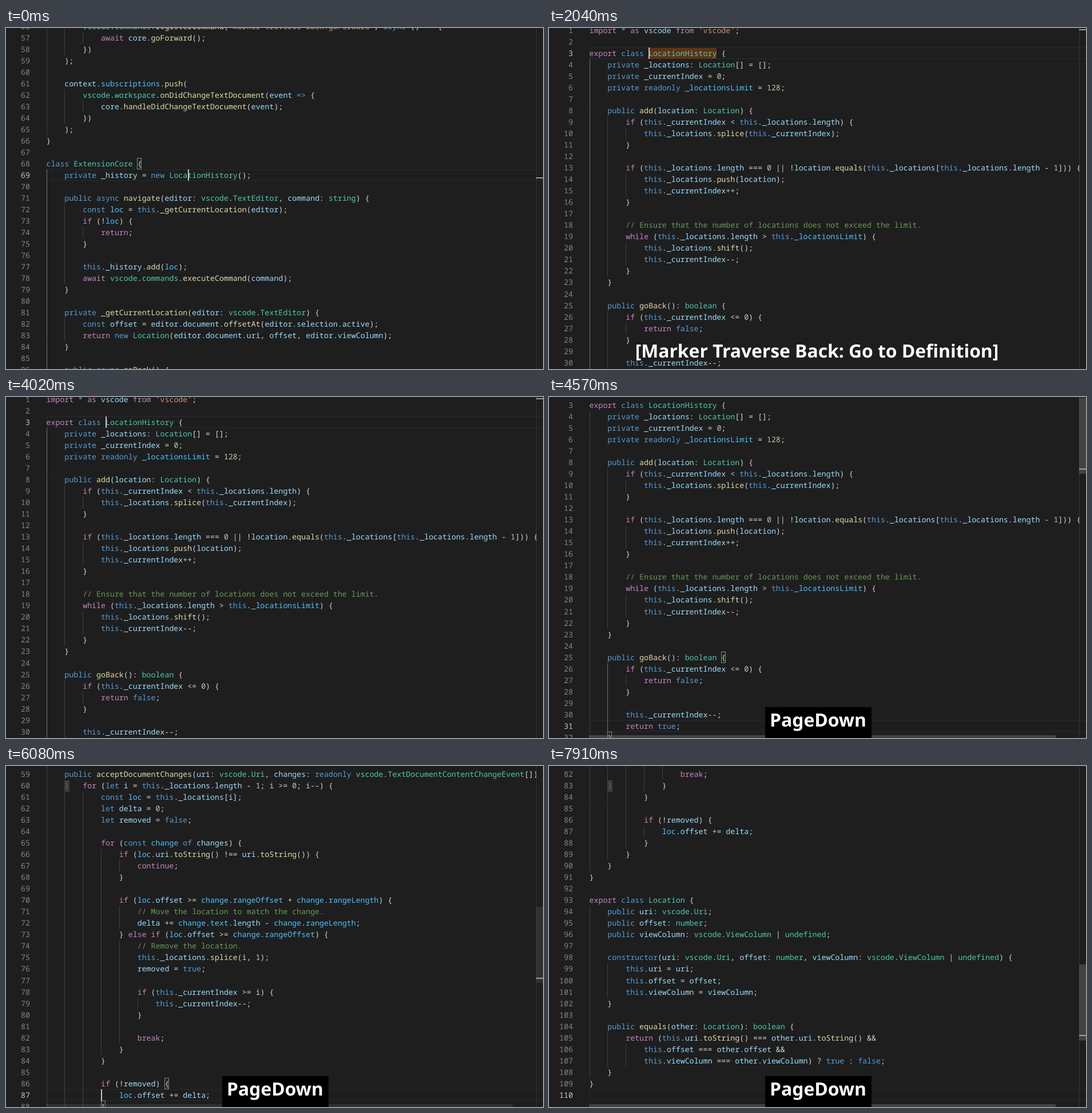
An HTML page with a canvas for the animation above (8000 ms loop, 939 by 596 pixels).

```html
<!DOCTYPE html>
<html lang="en">
<head>
<meta charset="utf-8">
<title>Code navigation</title>
<style>
html, body { margin: 0; width: 100%; height: 100%; overflow: hidden; background: #1e1e1e; }
canvas { display: block; }
</style>
</head>
<body>
<canvas id="stage" width="939" height="596"></canvas>
<script>
const LOOP = 8000, W = 939, H = 596;
const LEFT = 70.5, CHAR = 7.96, ROW = 20.02;
const ctx = document.getElementById('stage').getContext('2d');

const extensionFile = { first: 56, text: `
        vscode.commands.registerCommand('marker-traverse-back.goForward', async () => {
            await core.goForward();
        })
    );

    context.subscriptions.push(
        vscode.workspace.onDidChangeTextDocument(event => {
            core.handleDidChangeTextDocument(event);
        })
    );
}

class ExtensionCore {
    private _history = new LocationHistory();

    public async navigate(editor: vscode.TextEditor, command: string) {
        const loc = this._getCurrentLocation(editor);
        if (!loc) {
            return;
        }

        this._history.add(loc);
        await vscode.commands.executeCommand(command);
    }

    private _getCurrentLocation(editor: vscode.TextEditor) {
        const offset = editor.document.offsetAt(editor.selection.active);
        return new Location(editor.document.uri, offset, editor.viewColumn);
    }

    public async goBack() {` };

const historyFile = { first: 1, text: `
import * as vscode from 'vscode';

export class LocationHistory {
    private _locations: Location[] = [];
    private _currentIndex = 0;
    private readonly _locationsLimit = 128;

    public add(location: Location) {
        if (this._currentIndex < this._locations.length) {
            this._locations.splice(this._currentIndex);
        }

        if (this._locations.length === 0 || !location.equals(this._locations[this._locations.length - 1])) {
            this._locations.push(location);
            this._currentIndex++;
        }

        // Ensure that the number of locations does not exceed the limit.
        while (this._locations.length > this._locationsLimit) {
            this._locations.shift();
            this._currentIndex--;
        }
    }

    public goBack(): boolean {
        if (this._currentIndex <= 0) {
            return false;
        }

        this._currentIndex--;
        return true;
    }

    public goForward(): boolean {
        if (this._currentIndex >= this._locations.length - 1) {
            return false;
        }

        this._currentIndex++;
        return true;
    }

    public get locations(): readonly Location[] {
        return this._locations;
    }

    public get current(): Location | undefined {
        if (this._currentIndex >= this._locations.length) {
            return undefined;
        }

        return this._locations[this._currentIndex];
    }

    public get currentIndex(): number {
        return this._currentIndex;
    }

    public acceptDocumentChanges(uri: vscode.Uri, changes: readonly vscode.TextDocumentContentChangeEvent[]) {
        for (let i = this._locations.length - 1; i >= 0; i--) {
            const loc = this._locations[i];
            let delta = 0;
            let removed = false;

            for (const change of changes) {
                if (loc.uri.toString() !== uri.toString()) {
                    continue;
                }

                if (loc.offset >= change.rangeOffset + change.rangeLength) {
                    // Move the location to match the change.
                    delta += change.text.length - change.rangeLength;
                } else if (loc.offset >= change.rangeOffset) {
                    // Remove the location.
                    this._locations.splice(i, 1);
                    removed = true;

                    if (this._currentIndex >= i) {
                        this._currentIndex--;
                    }

                    break;
                }
            }

            if (!removed) {
                loc.offset += delta;
            }
        }
    }
}

export class Location {
    public uri: vscode.Uri;
    public offset: number;
    public viewColumn: vscode.ViewColumn | undefined;

    constructor(uri: vscode.Uri, offset: number, viewColumn: vscode.ViewColumn | undefined) {
        this.uri = uri;
        this.offset = offset;
        this.viewColumn = viewColumn;
    }

    public equals(other: Location): boolean {
        return (this.uri.toString() === other.uri.toString() &&
            this.offset === other.offset &&
            this.viewColumn === other.viewColumn) ? true : false;
    }
}
` };

const words = list => new Set(list.split(' '));
const control = words('import export from as if else return while for await continue break');
const storage = words('class const let private public readonly new this async true false undefined constructor of get');
const types = words('vscode workspace commands string number boolean');
const constants = words('loc change rangeOffset rangeLength text _locationsLimit subscriptions');

function tokenColor(token, before, after) {
  if (token.startsWith('//')) return '#6a9955';
  if (token[0] === "'") return '#ce9178';
  if (/^\d/.test(token)) return '#b5cea8';
  if (token === '=>' || token === '*') return '#569cd6';
  if (!/^\w/.test(token)) return '#d4d4d4';
  if (control.has(token)) return '#c586c0';
  if (token === 'undefined' && before.endsWith('| ')) return '#4ec9b0';
  if (storage.has(token)) return '#569cd6';
  if (/^[A-Z]/.test(token)) return '#4ec9b0';
  if (types.has(token) && !before.startsWith('import')) return '#4ec9b0';
  if (after[0] === '(') return '#dcdcaa';
  return constants.has(token) ? '#4fc1ff' : '#9cdcfe';
}

function parse(file) {
  const rows = file.text.slice(1).split('\n');
  const depth = i => rows[i] ? rows[i].search(/\S/) / 4 : 0;
  file.lines = rows.map((row, i) => {
    const tokens = [...row.matchAll(/\/\/.*|'[^']*'|\w+|=>|[^\w\s]/g)].map(({ 0: text, index }) => ({
      text, col: index,
      color: tokenColor(text, row.slice(0, index), row.slice(index + text.length)),
    }));
    let indent = depth(i);
    if (!row && i > 0 && i < rows.length - 1) {
      const up = depth(i - 1), down = depth(i + 1);
      indent = up === down ? up : 1 + Math.min(up, down);
    }
    return { number: file.first + i, tokens, indent };
  });
}
[extensionFile, historyFile].forEach(parse);

// guide: [level, first line, last line]; brackets: [line, column]
const views = [
  { at: 0, file: extensionFile, line: 69, col: 31, top: 247.2, guide: [0, 69, 90], brackets: [[68, 20]] },
  { at: 1980, file: historyFile, line: 3, col: 13, top: 34.4, guide: [0, 4, 90], brackets: [] },
  { at: 4100, file: historyFile, line: 31, col: 13, top: 565, guide: [1, 26, 31], brackets: [[25, 29], [32, 4]] },
  { at: 5130, file: historyFile, line: 59, col: 13, top: 565, guide: [1, 60, 89], brackets: [[32, 4]] },
  { at: 5270, file: historyFile, line: 59, col: 13, top: 565, guide: [1, 60, 89], brackets: [] },
  { at: 6010, file: historyFile, line: 87, col: 12, top: 565, guide: [3, 87, 87], brackets: [[86, 26], [88, 12]] },
  { at: 7450, file: historyFile, line: 110, col: 0, top: 565, guide: [0, 0, 0], brackets: [] },
];
const cursorOn = [[0, 460], [920, 1380], [1980, 2540], [3100, 3560], [4020, 4570], [4990, 5670], [6010, 6550], [7040, 7910]];
const captions = [
  { from: 1910, to: 3430, text: '[Marker Traverse Back: Go to Definition]' },
  { from: 4100, to: 6900, text: 'PageDown', boxed: true },
  { from: 7380, to: LOOP, text: 'PageDown', boxed: true },
];
// Spans in which the scrollbars are shown; they fade out until the next scroll
const scrollbarShown = [[4100, 4990], [5130, 5670], [6010, LOOP]];
const FADE_IN = 140;

const colX = col => LEFT + col * CHAR;

function rect(color, x, y, w, h) {
  ctx.fillStyle = color;
  ctx.fillRect(x, y, w, h);
}

function outline(color, x, y, w, h) {
  ctx.strokeStyle = color;
  ctx.lineWidth = 1;
  ctx.strokeRect(Math.round(x) + .5, Math.round(y) + .5, w, h);
}

function label(text, x, y, color, align = 'left') {
  ctx.fillStyle = color;
  ctx.textAlign = align;
  ctx.fillText(text, x, y);
}

function drawCode(view, t) {
  const rowY = n => view.top + (n - view.line) * ROW;
  const [level, first, last] = view.guide;
  outline('#2b2b2b', 71, view.top, W, 19);
  if (t >= 1980 && t < 2410) rect('#613214', 174, 35, 119, 19);
  for (const [n, col] of view.brackets) {
    rect('rgba(0,100,0,.1)', colX(col), rowY(n), 8, 20);
    outline('#888', colX(col) - .3, rowY(n), 7, 19);
  }

  ctx.font = '500 13.27px "Noto Sans Mono", monospace';
  for (const { number, tokens, indent } of view.file.lines) {
    const y = rowY(number), baseline = Math.round(y + 14.7);
    if (y < -ROW || y > H) continue;
    for (let k = 0; k < indent; k++) {
      const active = k === level && number >= first && number <= last;
      rect(active ? '#707070' : '#404040', Math.floor(colX(k * 4) + .5), Math.round(y), 1, 20);
    }
    label(number, 42, baseline, number === view.line ? '#c6c6c6' : '#858585', 'right');
    for (const { text, col, color } of tokens) label(text, colX(col), baseline, color);
  }

  // Leftover bracket highlight after the second page
  if (t >= 5270) {
    rect('#3c3c3c', 103, 25, 8, 20);
    label('}', 102.5, 39, '#606060');
  }
  if (cursorOn.some(([on, off]) => t >= on && t < off)) {
    rect('#c4c4c2', Math.round(colX(view.col) + .3), Math.round(view.top), 2, 20);
  }
}

function scrollbarOpacity(t) {
  const i = scrollbarShown.findLastIndex(([from]) => t >= from);
  if (i < 0) return 0;
  const [from, to] = scrollbarShown[i];
  if (t < to) return Math.min(1, (t - from) / FADE_IN);
  return 1 - (t - to) / (scrollbarShown[i + 1][0] - to);
}

function drawScrollbars(view, t) {
  const markY = view.file === extensionFile ? 261 : 2 + (view.line - 3) * 4.375;
  const topLine = view.line - (view.top - 4.5) / ROW;
  const slider = `rgba(121,121,121,${.4 * scrollbarOpacity(t)})`;
  rect('#343434', 927, 0, 1, H);
  rect(slider, 927, 1.2 + (topLine - 3) * 4.375, 12, 133);
  rect(slider, 70, 591, 816, 5);
  rect('#a0a0a0', 927, Math.round(markY), 12, 2);
}

function drawCaption(t) {
  const caption = captions.find(c => t >= c.from && t < c.to);
  if (!caption) return;
  if (caption.boxed) rect('#000', 378, 542, 186, 54);
  ctx.font = 'bold 31.8px "Noto Sans", sans-serif';
  label(caption.text, caption.boxed ? 470.5 : 468.5, 576, '#fff', 'center');
}

function frame() {
  const t = performance.now() % LOOP;
  const view = views.findLast(v => t >= v.at);
  ctx.textRendering = 'geometricPrecision';
  rect('#1e1e1e', 0, 0, W, H);
  drawCode(view, t);
  drawScrollbars(view, t);
  drawCaption(t);
  requestAnimationFrame(frame);
}
frame();
</script>
</body>
</html>
```
